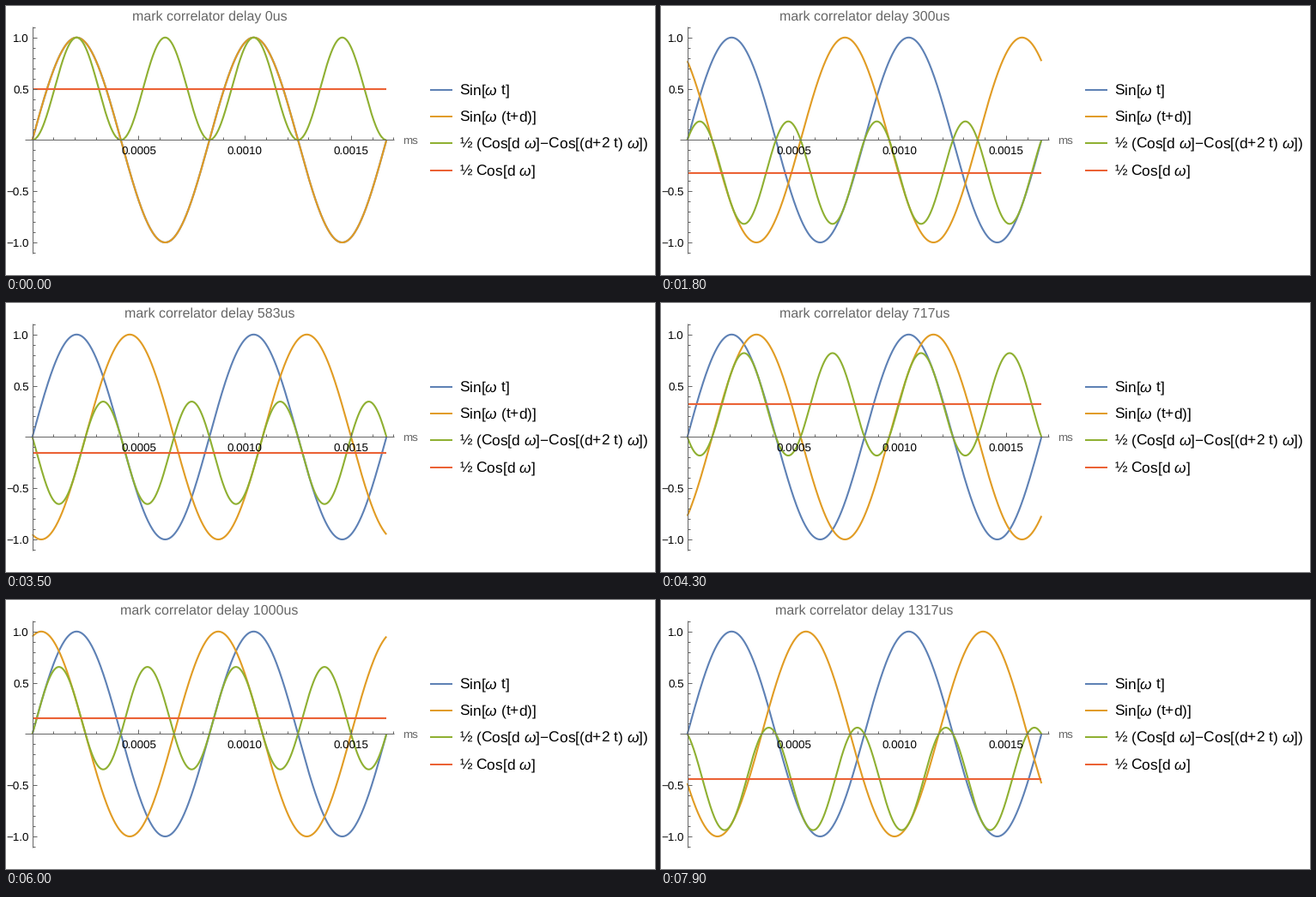
Recreate the animation shown at these times as a matplotlib script. Size 756 by 314 pixels, loop 8000 ms.

```python
import numpy as np
import matplotlib.pyplot as plt
from matplotlib.animation import FuncAnimation

plt.rcParams.update({
    "font.family": "Liberation Sans",
    "mathtext.fontset": "custom",
    "mathtext.rm": "Liberation Sans",
    "mathtext.it": "Liberation Sans:italic",
    "mathtext.default": "rm",
    "text.hinting": "none",
    "axes.unicode_minus": True,
})

W, H, DPI = 756, 314, 100
FRAMES, INTERVAL = 80, 100
FREQ = 1200.0
OMEGA = 2 * np.pi * FREQ
T_END = 2 / FREQ
STEP = T_END / 100            # delay added per frame, in seconds

X0, Y0 = 30.7, 156.4          # plot origin in pixels
SX, SY = 247.5 / 0.001, 119.6

BLUE, ORANGE, GREEN, RED = "#5E81B5", "#E19C24", "#8FB032", "#EB6235"
GREY = "#666666"


def pt(px):
    return px * 72 / DPI


def to_x(t):
    return X0 + SX * t


def to_y(v):
    return Y0 - SY * v


fig = plt.figure(figsize=(W / DPI, H / DPI), dpi=DPI, facecolor="white")
ax = fig.add_axes([0, 0, 1, 1])
ax.set(xlim=(0, W), ylim=(H, 0))
ax.axis("off")


def rule(xs, ys):
    ax.plot(xs, ys, color=GREY, lw=pt(1), zorder=5,
            solid_capstyle="butt", snap=True)


def label(x, y, s, px, color="black", ha="left"):
    return ax.text(x, y, s, fontsize=pt(px), color=color, ha=ha,
                   va="baseline", zorder=6)


def draw_axes():
    rule([22, 452], [Y0, Y0])
    rule([X0, X0], [24, 289])
    for i in range(18):
        x = to_x(i * 1e-4)
        major = i % 5 == 0
        rule([x, x], [Y0, Y0 - (5.5 if major else 3.5)])
        if major and i:
            label(x, 172.4, f"{i * 1e-4:.4f}", 13.33, ha="center")
    for i in range(-11, 12):
        y = to_y(i / 10)
        major = i % 5 == 0
        rule([X0, X0 + (5.5 if major else 3.5)], [y, y])
        if major and i:
            text = f"{i / 10:.1f}".replace("-", "\u2212")
            label(26.6, y + 4.8, text, 13.33, ha="right")
    label(462.5, 161, "ms", 13.33, GREY)


def draw_legend():
    w = r"\mathit{\omega}"
    rows = [
        (BLUE, rf"$Sin[{w}\ t]$"),
        (ORANGE, rf"$Sin[{w}\ (t{{+}}d)]$"),
        (GREEN, rf"$½\ (Cos[d\ {w}]{{-}}Cos[(d{{+}}2\ t)\ {w}])$"),
        (RED, rf"$½\ Cos[d\ {w}]$"),
    ]
    for i, (color, text) in enumerate(rows):
        y = 98 + 31.2 * i
        ax.plot([494, 520], [y, y], color=color, lw=pt(2),
                solid_capstyle="butt")
        label(528.3, y + 5.4, text, 17.33)


draw_axes()
draw_legend()
title = label(237, 17, "", 16, GREY, "center")

t = np.linspace(0, T_END, 500)
curves = [ax.plot([], [], color=c, lw=pt(2.1), solid_capstyle="butt",
                  solid_joinstyle="round", zorder=3)[0]
          for c in (BLUE, ORANGE, GREEN, RED)]


def update(frame):
    d = frame * STEP
    direct = np.sin(OMEGA * t)
    delayed = np.sin(OMEGA * (t + d))
    mean = np.full_like(t, np.cos(OMEGA * d) / 2)
    for line, v in zip(curves, (direct, delayed, direct * delayed, mean)):
        line.set_data(to_x(t), to_y(v))
    title.set_text(f"mark correlator delay {round(d * 1e6)}us")
    return [*curves, title]


anim = FuncAnimation(fig, update, frames=FRAMES, interval=INTERVAL,
                     repeat=True, repeat_delay=0, blit=False)
plt.show()
```
